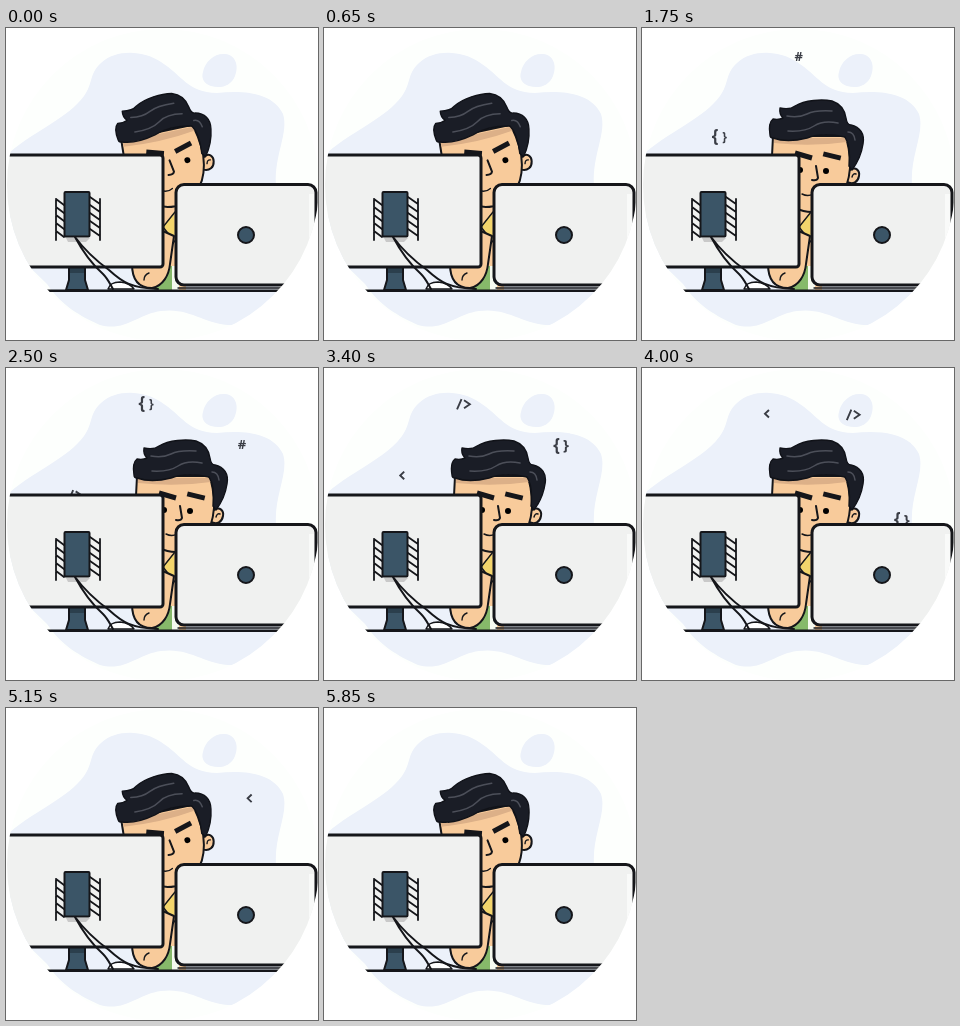
An HTML page for the animation above (5.9 s loop, 312 by 312 pixels).

```html
<!DOCTYPE html>
<html lang="en">
<head>
<meta charset="utf-8">
<title>Developer at work</title>
<style>
html, body { margin: 0; width: 100%; height: 100%; overflow: hidden; background: #fff; }
svg { display: block; width: 100vw; height: 100vh; }
.ink { fill: none; stroke: #15161a; stroke-width: 2; stroke-linecap: round; stroke-linejoin: round; }
.blob { fill: #ecf1fa; }
.skin { fill: #f8cb9b; }
.slate { fill: #3b5567; }
.panel { fill: #f0f1f0; stroke-width: 3; }
.hair { fill: #1a1d26; stroke: #101218; stroke-width: 1.4; }
.strand { stroke: #4c4f59; stroke-width: 1.5; }
.brow { stroke-width: 5; stroke-linecap: butt; }
.thin { stroke-width: 1.4; }
.symbol { fill: #3a3d45; font: bold 13px "Open Sans", "Noto Sans", sans-serif; text-anchor: middle; }
.symbol path { fill: none; stroke: #3a3d45; stroke-width: 1.9; }
</style>
</head>
<body>
<svg viewBox="0 0 312 312">
  <defs>
    <clipPath id="stage"><circle cx="157" cy="157" r="156"/></clipPath>
  </defs>
  <g clip-path="url(#stage)">
    <rect width="312" height="312" fill="#fdfffd"/>
    <path class="blob" d="M4 124C30 102 62 90 78 68C87 56 83 46 95 35C111 20 139 23 155 34C177 48 181 64 211 65C236 62 267 64 277 86C283 105 268 127 270 157L277 235C278 265 252 296 226 297C199 297 184 279 155 283C132 286 119 304 94 297C74 288 56 278 41 256L4 220Z"/>
    <path class="blob" d="M197 44C199 33 209 25 219 26C230 27 233 38 229 48C225 58 215 61 205 58C198 56 195 50 197 44Z"/>

    <g id="symbols">
      <g class="symbol"><text y="4.6">#</text></g>
      <g class="symbol"><text x="-4.5" y="5" style="font-size:17px">{</text><text id="brace" x="5" y="4.5">}</text></g>
      <g class="symbol"><path d="M-2-5.2L-6.5 5.2M0.5-4L6.3 0L0.5 4"/></g>
      <g class="symbol"><path d="M2-3.8L-2 0L2 3.8"/></g>
    </g>

    <g id="body">
      <path class="skin" d="M150 168H180V262H150Z"/>
      <path d="M168 184L157 198L169 212Z" fill="#f3d56c"/>
      <path class="ink thin" d="M169 184L157 199L169 214"/>
      <path d="M148 262L163 238H166V262Z" fill="#86b96a"/>
      <path d="M166 238H173V262H166Z" fill="#f6faef"/>
      <path class="ink skin" d="M126 236C126 252 132 260 146 260C157 258 163 247 164 236L168 208L150 200Z"/>
      <path class="ink thin" d="M143 245Q138 247 138 252"/>
    </g>

    <g id="head">
      <path class="ink skin" d="M208 142C214 138 218 143 217 148C216 154 211 157 205 154"/>
      <path class="ink thin" d="M210 149Q211 145 214 146"/>
      <path class="ink skin" d="M131 108H203Q208 118 208 140C206 165 194 182 170 184C145 184 132 160 130 128Z"/>
      <path d="M132 110H204L205 114Q170 119 132 115Z" fill="#dcb088"/>
      <path class="ink hair" d="M128 107Q126 95 131 91Q137 92 141 90Q137 86 138 80Q148 82 153 78C163 72 180 71 190 73Q202 77 204 90Q205 97 209 97C218 99 223 106 221 116Q219 130 210 142L207 138Q209 118 203 109Q181 104 165 110Q145 115 131 110Q128 110 128 107Z"/>
      <path class="ink strand" d="M145 88Q157 90 165 86T190 83M146 103Q163 104 172 98T196 95M206 104Q212 104 213 112"/>
      <path class="ink" d="M174 138L176 150Q175 153 170 152"/>
      <path class="ink thin" d="M160 166Q166 169 171 166"/>
      <path class="ink brow" d="M153 125L170 130"/>
      <path id="brow" class="ink brow" d="M181 128H199"/>
      <circle cx="158" cy="142" r="3"/>
      <circle id="eye" cx="184" cy="143" r="3"/>
    </g>

    <path class="ink thin" d="M102 261Q104 254 114 254Q124 255 128 261Z" style="fill:#fff"/>
    <path class="ink slate" d="M63 239H79V252L82 262H60L63 252Z"/>
    <path d="M64 240H78V245H64Z" fill="#2b3f4d"/>
    <rect class="ink panel" x="-12" y="127" width="169" height="112" rx="3"/>
    <path d="M60 210H84L80 214H62Z" fill="#c9c9c9"/>
    <path id="grille" class="ink" style="stroke-width:1.8"/>
    <rect class="ink slate" x="58.5" y="164" width="25" height="44.5" rx="1"/>
    <path class="ink" d="M69 209C80 224 92 234 103 242C116 254 125 260 152 261M69 209C78 226 88 238 97 246C102 251 104 256 107 261"/>

    <path class="ink" d="M35 262.8H280" style="stroke-width:2.5"/>
    <path class="ink thin" d="M172 260H276"/>
    <rect class="ink panel" x="170" y="156.5" width="140" height="100.5" rx="8"/>
    <path d="M303 166H308V250H303Z" fill="#f9faf9"/>
    <circle class="ink slate" cx="240" cy="207" r="8"/>
  </g>
</svg>
<script>
const LOOP = 5900, STEP = 50, SPEED = 0.131, LEAD = 29;
const NS = "http://www.w3.org/2000/svg";
const $ = id => document.getElementById(id);

// Arc that every symbol follows, from the monitor over the head to the laptop.
const stops = [[60, 150], [71, 123], [79, 106], [102, 66], [135, 39], [161, 28],
  [186, 31], [215, 50], [236, 76], [248, 101], [257, 130], [262, 175]];

function smoothPath(pts) {
  const at = i => pts[Math.max(0, Math.min(pts.length - 1, i))];
  let d = "M" + pts[0];
  for (let i = 0; i < pts.length - 1; i++) {
    const [a, b, c, e] = [at(i - 1), at(i), at(i + 1), at(i + 2)];
    const c1 = b.map((v, k) => v + (c[k] - a[k]) / 6);
    const c2 = c.map((v, k) => v - (e[k] - b[k]) / 6);
    d += `C${c1} ${c2} ${c}`;
  }
  return d;
}

const track = document.createElementNS(NS, "path");
track.setAttribute("d", smoothPath(stops));
const trackLength = track.getTotalLength();
const symbols = [...$("symbols").children];
const starts = [742, 1628, 2535, 3268];

function buildGrille() {
  let d = "M50 171V212M94 171V212";
  for (let i = 0; i < 5; i++) {
    const y = 169 + i * 8;
    d += `M50 ${y + 2}L58 ${y + 8}M84 ${y}L94 ${y + 7}`;
  }
  $("grille").setAttribute("d", d);
}

function ease(t, from, to) {
  const u = Math.max(0, Math.min(1, (t - from) / (to - from)));
  return u * u * (3 - 2 * u);
}

// turn = 0 looks at the monitor, turn = 1 at the laptop.
function poseHead(turn) {
  const back = 1 - turn;
  const set = (id, value) => $(id).setAttribute("transform", value);
  set("head", `translate(${-15.5 * back} ${-5.5 * back}) rotate(${-12 * back} 176 114)`);
  set("brow", `rotate(${14 - 30 * back} 190 128)`);
  set("eye", `translate(${7.5 * back} ${-1.5 * back})`);
}

function render(t) {
  poseHead(ease(t, 1400, 1700) - ease(t, 4050, 4350));
  symbols.forEach((symbol, i) => {
    const s = LEAD + (t - starts[i]) * SPEED;
    const visible = s > 0 && s < trackLength;
    symbol.style.display = visible ? "" : "none";
    if (!visible) return;
    const p = track.getPointAtLength(s);
    symbol.setAttribute("transform", `translate(${p.x} ${p.y})`);
  });
  $("brace").style.fontSize = 12 + 3 * ease(t, 2500, 3400) + "px";
}

function tick(now) {
  render(Math.floor((now % LOOP) / STEP) * STEP);
  requestAnimationFrame(tick);
}

buildGrille();
render(0);
requestAnimationFrame(tick);
</script>
</body>
</html>
```
